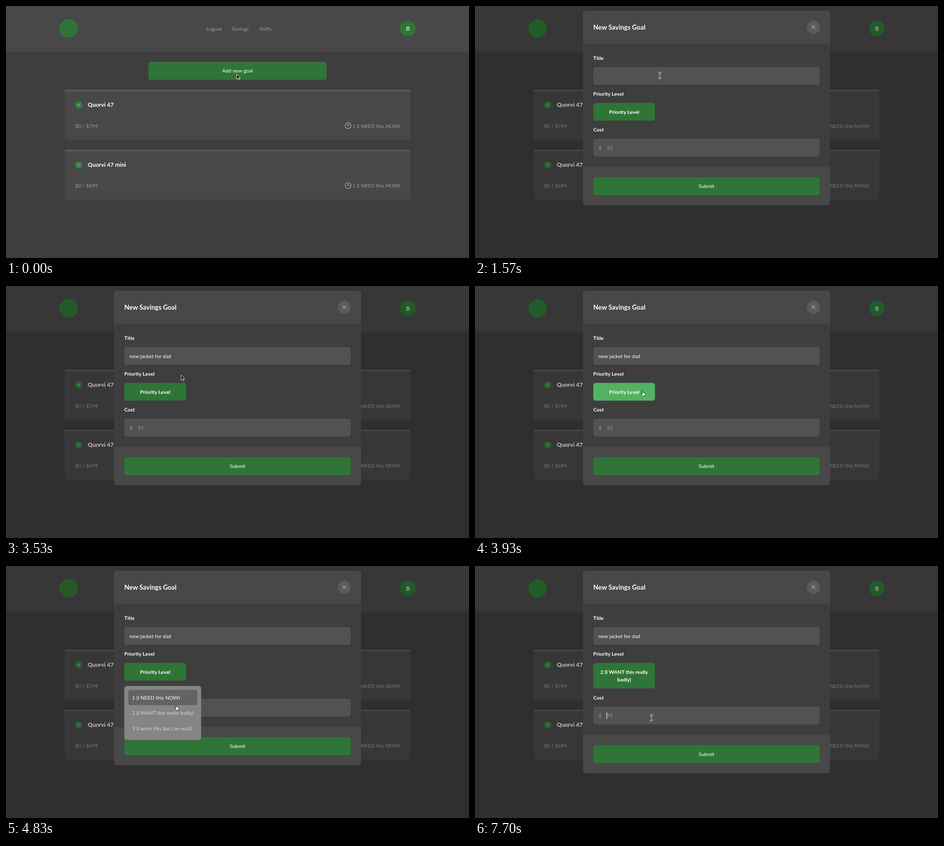
These frames come from a looping animation (917x500 px, 8000 ms). An HTML page:

```html
<!DOCTYPE html>
<html lang="en">
<head>
<meta charset="utf-8">
<title>Savings goals</title>
<style>
  html, body { margin: 0; width: 100%; height: 100%; overflow: hidden; background: #3e3e3e; }
  svg { display: block; width: 100vw; height: 100vh; }
  text { font: 400 10.24px Lato, "Open Sans", sans-serif; fill: #fff; }
  .bold { font-weight: 700; }
  .mid { text-anchor: middle; }
  .grey { fill: #9c9c9c; }
  .dim { fill: #d4d4d4; }
  .name { font-size: 11.4px; font-weight: 700; }
  .head { font-size: 13px; font-weight: 700; }
  .green { fill: #2f7537; }
  .panel { fill: #484848; }
  .field { fill: #525252; }
  .line { fill: none; stroke: #9c9c9c; stroke-width: 1.4; stroke-linecap: round; }
  .caret { fill: #fff; }
  #cursor path { stroke-linejoin: round; }
</style>
</head>
<body>
<svg viewBox="0 0 917 500" preserveAspectRatio="none">
  <rect width="917" height="500" fill="#3e3e3e"/>
  <rect class="panel" width="917" height="90.5"/>
  <circle cx="124" cy="44.5" r="18.5" class="green"/>
  <text class="grey" x="396.3" y="48.5">Logout</text>
  <text class="grey" x="447.3" y="48.5">Savings</text>
  <text class="grey" x="501.5" y="48.5">Shifts</text>
  <circle class="green" cx="796" cy="44.5" r="15.5"/>
  <text class="mid" x="796" y="48.6" style="font-size:11.5px">B</text>

  <rect id="add" x="282" y="110.8" width="353" height="35.8" rx="5"/>
  <text class="mid" x="458.5" y="132.4">Add new goal</text>
  <g id="cards"></g>

  <rect id="shade" width="917" height="500"/>

  <g id="modal">
    <g id="shell"></g>
    <text class="head" x="234.3" y="46.6">New Savings Goal</text>
    <circle cx="670" cy="42" r="13" fill="#5b5b5b"/>
    <path class="line" style="stroke:#b4b4b4;stroke-width:1.2" d="M666.8 38.8l6.4 6.4m0-6.4l-6.4 6.4"/>

    <text class="bold" x="234.3" y="107">Title</text>
    <rect class="field" x="234.3" y="121" width="448.4" height="35.6" rx="5"/>
    <text id="title" x="244.6" y="142.6"></text>
    <rect id="titleCaret" class="caret" y="132.3" width="1" height="13.2"/>

    <text class="bold" x="234.3" y="178.2">Priority Level</text>
    <rect id="pick" x="234.3" y="192.2" width="122.2" rx="5"/>
    <text id="pick1" class="bold mid" x="295.4" y="213.9"></text>
    <text id="pick2" class="bold mid" x="295.4" y="229.3">badly)</text>

    <g id="lower">
      <text class="bold" x="234.3" y="249.3">Cost</text>
      <rect class="field" x="234.3" y="263.4" width="448.4" height="35.4" rx="5"/>
      <text class="grey" x="244.8" y="285">$</text>
      <text class="grey" x="260.8" y="285">55</text>
      <rect id="costCaret" class="caret" x="260.4" y="275" width="1" height="13.2"/>
      <rect class="green" x="234.3" y="339.8" width="448.4" height="35.6" rx="5"/>
      <text class="mid" x="458.5" y="361.4">Submit</text>
    </g>

    <g id="menu">
      <rect x="234.3" y="238" width="152.2" height="107" rx="5" fill="#858585"/>
      <rect id="hover" x="242" width="137" height="30.6" rx="5" fill="#636363"/>
      <text x="249.7" y="264.7">1 (I NEED this NOW)</text>
      <text x="249.7" y="295.4">2 (I WANT this really badly)</text>
      <text x="249.7" y="326">3 (I want this but can wait)</text>
    </g>
  </g>

  <g id="cursor">
    <path id="arrow" d="M0 0V9.6L2.3 7.5 3.8 11 5.6 10.2 4.1 6.8H7Z" fill="#000" stroke="#fff" stroke-width=".9"/>
    <path id="hand" d="M-1 1Q-1 0 0 0T1 1L1.4 4 4.5 4.6Q5.8 5 5.6 6.5L4.8 10.6H0L-2.4 7.2Q-3 6 -2 5.6L-.5 6.6Z" fill="#fff" stroke="#111" stroke-width=".9"/>
    <g id="beam" fill="none">
      <path stroke="#e8e8e8" stroke-width="2.5" d="M-2.8 -5.6Q-.8 -5.6 0 -4.8Q.8 -5.6 2.8 -5.6M0 -4.8V4.8M-2.8 5.6Q-.8 5.6 0 4.8Q.8 5.6 2.8 5.6M-1.3 1.4H1.3"/>
      <path stroke="#222" stroke-width=".9" d="M-2.8 -5.6Q-.8 -5.6 0 -4.8Q.8 -5.6 2.8 -5.6M0 -4.8V4.8M-2.8 5.6Q-.8 5.6 0 4.8Q.8 5.6 2.8 5.6M-1.3 1.4H1.3"/>
    </g>
  </g>
</svg>
<script>
const LOOP = 8000;
const GREEN = [47, 117, 55], LIGHT = [83, 178, 97], TEAL = [46, 141, 141];
const $ = id => document.getElementById(id);
const set = (id, attrs) => {
  for (const key in attrs) $(id).setAttribute(key, attrs[key]);
};
const show = (id, on) => set(id, { visibility: on ? 'inherit' : 'hidden' });
const clamp = v => Math.max(0, Math.min(1, v));
const ramp = (t, start, end) => clamp((t - start) / (end - start));
const ease = p => p * p * (3 - 2 * p);
const mix = (a, b, p) => `rgb(${a.map((v, i) => Math.round(v + (b[i] - v) * p))})`;
const within = (t, ...spans) => spans.some(([a, b]) => t >= a && t < b);

// time, x, y of the pointer's hot spot
const PATH = [
  [0, 457, 135.5], [300, 457, 135.5], [800, 446.5, 127.5],
  [1370, 446.5, 127.5], [1570, 366, 137.8],
  [3100, 366, 137.8], [3900, 331.8, 207.8],
  [4070, 331.8, 207.8], [4630, 337, 275.6],
  [4830, 337, 275.6], [5200, 344.5, 290.8],
  [6070, 344.5, 290.8], [6200, 362, 295], [6370, 349.6, 301.4],
  [LOOP, 349.6, 301.4]
];

function pointer(t) {
  const i = PATH.findIndex(p => p[0] > t);
  const [t0, x0, y0] = PATH[i - 1], [t1, x1, y1] = PATH[i];
  const p = ease(ramp(t, t0, t1));
  return [x0 + (x1 - x0) * p, y0 + (y1 - y0) * p];
}

function shape(t, y) {
  if (t < 330) return 'arrow';
  if (t < 970) return 'hand';
  if (t < 3100 || t >= 5770) return 'beam';
  if (t < 4070) return y < 156.6 ? 'beam' : y < 192 ? 'arrow' : 'hand';
  return y > 227.8 && y < 238 ? 'arrow' : 'hand';
}

function card(y, name, price) {
  return `<g transform="translate(0 ${y})">
    <rect class="panel" x="116" width="685" height="98.8" rx="5"/>
    <path d="M116 3V2Q116 0 118 0H799Q801 0 801 2V3Z" fill="#5b5b5b"/>
    <circle cx="144" cy="30" r="5.7" fill="none" stroke="#2eb045" stroke-width="1.5"/>
    <circle cx="144" cy="30" r="3.4" fill="#2eb045"/>
    <text class="name" x="162" y="33.6">${name}</text>
    <text class="grey" x="136.7" y="75">$0 / $${price}</text>
    <circle class="line" cx="677.5" cy="70.8" r="5.8"/>
    <path class="line" d="M677.5 67.4V70.8H680.4"/>
    <text class="grey" x="781" y="75" text-anchor="end">1 (I NEED this NOW)</text>
  </g>`;
}

function shell(grow) {
  return `<rect class="panel" x="214" y="9.2" width="489" height="${386.4 + grow}" rx="5"/>
    <rect x="214" y="75" width="489" height="${244.4 + grow}" fill="#3e3e3e"/>`;
}

$('cards').innerHTML = card(166.5, 'Quorvi 47', 799) + card(285.4, 'Quorvi 47 mini', 699);

function draw(t) {
  const [x, y] = pointer(t);

  set('add', { fill: t < 970 ? mix(GREEN, LIGHT, ramp(t, 300, 500)) : mix(TEAL, TEAL, 0) });

  const open = 1 - (1 - ramp(t, 970, 1200)) ** 2;
  const scale = 0.95 + 0.05 * open;
  set('shade', { opacity: 0.24 * open });
  set('modal', {
    opacity: open,
    transform: `translate(458.5 202.4) scale(${scale}) translate(-458.5 -202.4)`
  });

  const title = t >= 2800 ? 'new jacket for dad' : '';
  $('title').textContent = title;
  set('titleCaret', { x: 244.5 + (title ? $('title').getComputedTextLength() + 0.4 : 0) });
  show('titleCaret', within(t, [1730, 2185], [2700, 3300], [3800, 3930]));

  const chosen = t >= 5770;
  const grow = chosen ? 15.4 : 0;
  $('shell').innerHTML = shell(grow);
  const over = ramp(t, 3620, 3820) * (1 - ramp(t, 4200, 4400));
  set('pick', { height: 35.4 + grow, fill: mix(GREEN, LIGHT, over) });
  $('pick1').textContent = chosen ? '2 (I WANT this really' : 'Priority Level';
  show('pick2', chosen);
  set('lower', { transform: `translate(0 ${grow})` });
  show('costCaret', within(t, [6730, 7185], [7700, LOOP]));

  show('menu', t >= 4070 && !chosen);
  set('menu', { opacity: ramp(t, 4040, 4200) });
  const row = y < 245.5 ? -1 : y < 276.3 ? 0 : 1;
  show('hover', row >= 0 && t >= 4070 && !chosen);
  set('hover', { y: 245.7 + 30.7 * Math.max(0, row) });
  $('menu').querySelectorAll('text').forEach((item, i) => {
    item.setAttribute('class', i === row ? '' : 'dim');
  });

  const kind = shape(t, y);
  for (const id of ['arrow', 'hand', 'beam']) show(id, id === kind);
  set('cursor', { transform: `translate(${x} ${y})` });
}

const begin = performance.now();
function tick() {
  draw((performance.now() - begin) % LOOP);
  requestAnimationFrame(tick);
}
tick();
</script>
</body>
</html>
```
